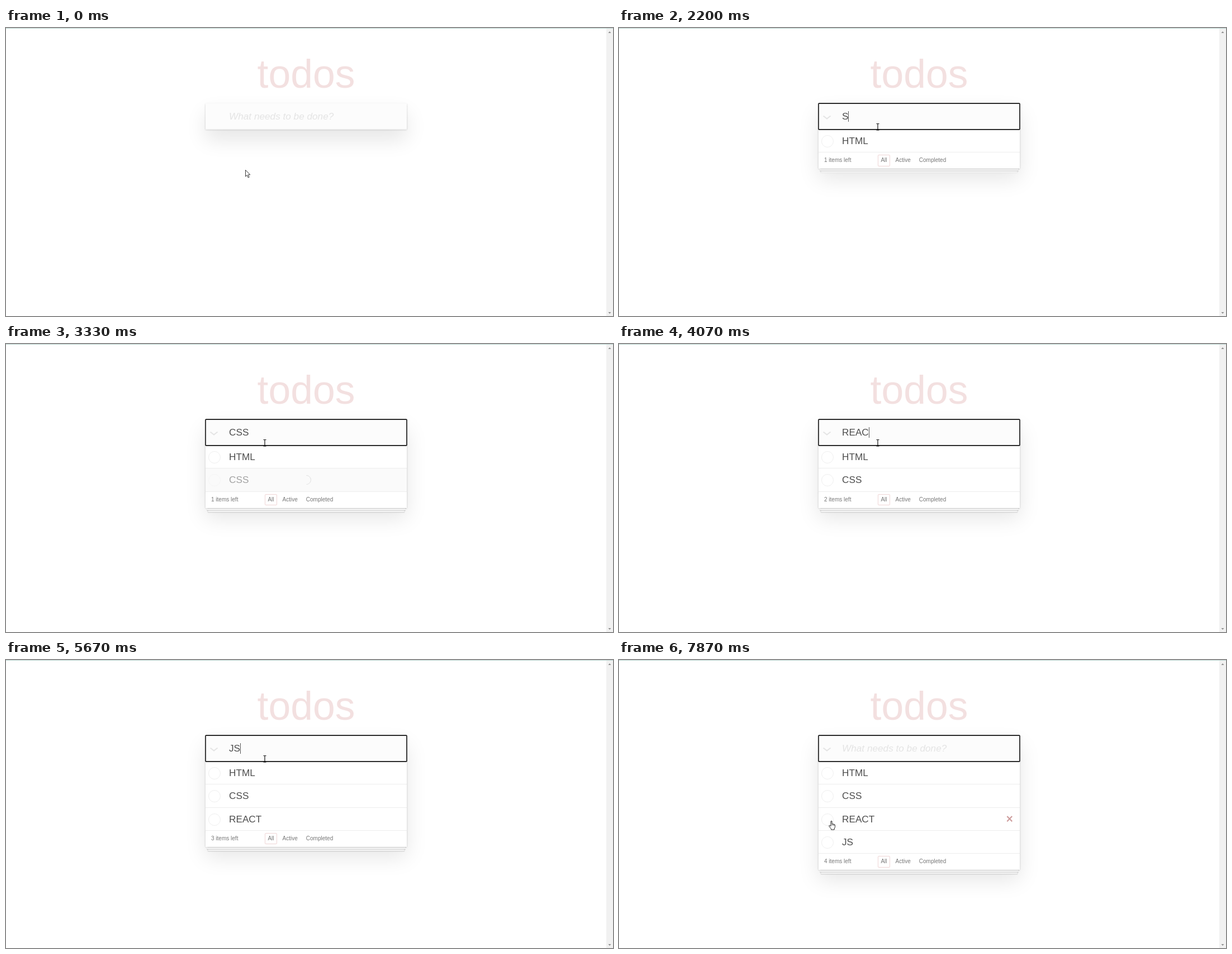
An HTML page that plays this animation: 1086x516 px, repeating every 8000 ms.

```html
<!DOCTYPE html>
<html lang="en">
<head>
<meta charset="utf-8">
<title>todos</title>
<style>
  html, body { margin: 0; width: 100%; height: 100%; overflow: hidden; background: #fff; }
  body { position: relative; font-family: "Liberation Sans", Arial, sans-serif; color: #4d4d4d; }
  div, span, svg { box-sizing: border-box; white-space: nowrap; }
  #edge { position: absolute; left: 0; top: 0; width: 100%; height: 1px; background: #b9d4cf; }
  #title { position: absolute; left: 357px; top: 41px; width: 360px; line-height: 82px;
    font-size: 71.5px; text-align: center; color: rgba(175, 47, 47, .15); }
  #card { position: absolute; left: 357px; top: 135px; width: 360px; background: #fff; font-size: 17.2px;
    box-shadow: 0 1.4px 2.9px rgba(0, 0, 0, .2), 0 17.9px 35.8px rgba(0, 0, 0, .1); }
  #field { position: relative; height: 47px; line-height: 47px; padding-left: 42px; display: flex;
    align-items: center; background: #fcfcfc; box-shadow: inset 0 -1.4px 1px rgba(0, 0, 0, .03); }
  #hint { position: absolute; left: 42px; top: 0; font-style: italic; color: #e4e4e4; }
  #caret { width: 1px; height: 19px; background: #555; }
  #ring { position: absolute; left: -1px; top: -1px; z-index: 2; }
  #chevron { position: absolute; left: 7px; top: 20px; }
  .row { position: relative; overflow: hidden; background: #fff; }
  .row .body { height: 41.33px; line-height: 41.33px; padding-left: 42px; border-bottom: 1px solid #ededed; }
  .row .dot { position: absolute; left: 5px; top: 10px; width: 22px; height: 22px;
    border: 1px solid #efefef; border-radius: 50%; }
  .row .cross { position: absolute; left: 335.5px; top: 0; line-height: 40px; font-size: 21.5px;
    color: #cc9a9a; -webkit-text-stroke: .5px #cc9a9a; }
  .pending { background: #fafafa; }
  .pending span { opacity: .5; }
  .spinner { position: absolute; left: 172px; top: 50%; width: 17px; height: 17px; margin-top: -8.5px;
    border: 1.4px solid #dbdbdb; border-right-color: transparent; border-top-color: transparent;
    border-radius: 50%; opacity: .8; }
  #footer { position: relative; height: 29px; line-height: 28px; font-size: 10.03px; color: #777; background: #fff;
    box-shadow: 0 .7px .7px rgba(0, 0, 0, .2), 0 5.7px 0 -2.1px #f6f6f6, 0 6.5px .7px -2.1px rgba(0, 0, 0, .2),
      0 11.5px 0 -4.3px #f6f6f6, 0 12.2px 1.4px -4.3px rgba(0, 0, 0, .2); }
  #footer span { position: absolute; top: 0; }
  #footer .chosen { left: 106px; top: 4px; width: 22px; height: 20.5px;
    border: 1px solid rgba(175, 47, 47, .2); border-radius: 2px; }
  #bar { position: absolute; right: 0; top: 1px; width: 12px; height: 515px; background: #f1f1f1; }
  #pointer { position: absolute; left: 0; top: 0; z-index: 3; }
</style>
</head>
<body>
<div id="title">todos</div>
<div id="card">
  <div id="field">
    <svg id="chevron" width="16" height="12" fill="none" stroke="#e4e4e4" stroke-width="2"><path d="M1.5 2.5L8 7.5 14.5 2.5"/></svg>
    <span id="hint">What needs to be done?</span>
    <span id="typed"></span>
    <span id="caret"></span>
    <svg id="ring" width="362" height="49" fill="none" stroke="#111" stroke-width="1.6"><rect x="1" y="1.1" width="360" height="46.8" rx="1"/></svg>
  </div>
  <div id="list"></div>
  <div id="footer">
    <span id="count" style="left:10px"></span>
    <span class="chosen"></span>
    <span style="left:111.4px">All</span>
    <span style="left:137.6px">Active</span>
    <span style="left:179.8px">Completed</span>
  </div>
</div>
<svg id="bar" viewBox="0 0 12 515" fill="#8f8f8f"><path d="M3.5 8L6 5 8.5 8zM3.5 508L6 511 8.5 508z"/></svg>
<div id="edge"></div>
<svg id="pointer" width="1086" height="516">
  <g id="arrow"><path d="M.5 .5V12l2.7-2.4 2 4.4 1.9-.8-2-4.3h3.7z" fill="#fff" stroke="#222" stroke-width=".9"/></g>
  <g id="beam"><path d="M-2.5-5.5h1.700l.8.6.8-.6h1.700M0-5V5M-2.5 5.8h1.700l.8-.6.8.6h1.700" fill="none" stroke="#111" stroke-width="1.2"/></g>
  <g id="hand"><path d="M-1 1q1-1.3 2 0V5.5l4 .9q1.5.5 1.5 2V10.5q0 2-1.3 3.5V16H-.5V14.5L-4 10q-.7-1.2.4-1.7.9-.2 2.6 1.5z" fill="#fff" stroke="#222"/><path d="M1.2 6V8.5M3.2 6.5V8.7M5 7V9" stroke="#222" stroke-width=".7"/></g>
</svg>
<script>
const LOOP = 8000, TICK = 200 / 3, ROW = 41.33, LIST_TOP = 182;
const $ = id => document.getElementById(id);
const show = (el, on) => { el.style.display = on ? '' : 'none'; };
const smooth = p => { p = Math.min(1, Math.max(0, p)); return p * p * (3 - 2 * p); };

// All times below are counted in ticks.
const items = [
  { name: 'HTML', sent: 22, saved: 28 },
  { name: 'CSS', sent: 46, saved: 52 },
  { name: 'REACT', sent: 69, saved: 77 },
  { name: 'JS', sent: 88, saved: 94 }
];
const FOCUS = 12, BLINK = 7.8;
const type = (word, ...ticks) => ticks.map((tick, i) => [tick, word.slice(0, i + 1)]);
const edits = [
  [0, ''], [FOCUS, ''], ...type('HTML', 16, 17, 18, 19),
  [28, ''], [33, 'S'], [37, ''], ...type('CSS', 40, 41, 43),
  [52, ''], ...type('REACT', 58, 59, 60, 61, 62),
  [77, ''], ...type('JS', 84, 85), [94, '']
];
const moves = [
  { from: 0, to: 4, x: 463, y: 177 },
  { from: 98, to: 104, x: 432, y: 341 },
  { from: 109, to: 118, x: 380, y: 288 }
];

function makeRow(name, pending) {
  const el = document.createElement('div');
  el.className = pending ? 'row pending' : 'row';
  el.innerHTML = `<div class="body"><span class="label">${name}</span></div><span class="dot"></span>` +
    (pending ? '<div class="spinner"></div>' : '<div class="cross">×</div>');
  $('list').append(el);
  return el;
}
const rows = items.map(item => makeRow(item.name));
const draft = makeRow('', true);

const slide = ticks => smooth((ticks * TICK + 23) / 300);

function setHeight(el, height) {
  show(el, height > 0);
  el.style.height = height + 'px';
}

function pointerAt(tick) {
  let x = 428, y = 254;
  for (const m of moves) {
    const p = smooth((tick - m.from) / (m.to - m.from));
    x += (m.x - x) * p;
    y += (m.y - y) * p;
  }
  return { x, y };
}

function drawField(tick) {
  const [since, text] = edits.filter(e => e[0] <= tick).pop();
  const busy = items.some(i => tick >= i.sent && tick < i.saved);
  const lit = Math.floor((tick - since) / BLINK) % 2 === 0;
  $('typed').textContent = text;
  show($('hint'), !text);
  show($('caret'), tick >= FOCUS && !busy && lit);
  show($('ring'), tick >= FOCUS);
}

function drawList(tick, hovered) {
  items.forEach((item, i) => {
    setHeight(rows[i], tick < item.saved ? 0 : ROW * slide(tick - item.saved));
    show(rows[i].querySelector('.cross'), i === hovered);
  });
  // A saved draft closes while its finished row opens above it.
  const latest = items.filter(i => tick >= i.sent).pop();
  let height = 0;
  if (latest) {
    const open = slide(tick - latest.sent), shut = slide(tick - latest.saved);
    height = tick < latest.saved ? ROW * open : shut < 1 ? ROW * (1 - shut) + .6 : 0;
    draft.querySelector('.label').textContent = latest.name;
    const turn = (Math.min(tick - latest.sent, 4) * TICK + 23) / 500 * 360 + 15;
    draft.querySelector('.spinner').style.transform = `rotate(${turn}deg)`;
  }
  setHeight(draft, height);
  const saved = items.filter(i => tick >= i.saved).length;
  show($('footer'), saved);
  show($('chevron'), saved);
  $('count').textContent = saved + ' items left';
}

function drawPointer(x, y, hovered) {
  const kind = y < LIST_TOP ? 'beam' : hovered >= 0 && x < 386 ? 'hand' : 'arrow';
  for (const id of ['arrow', 'beam', 'hand']) show($(id), id === kind);
  $(kind).setAttribute('transform', `translate(${x} ${y})`);
}

function draw(ms) {
  const tick = Math.floor((ms % LOOP + 5) / TICK) % 120;
  const { x, y } = pointerAt(tick);
  const hovered = tick < items[3].saved ? -1 : Math.floor((y - LIST_TOP) / ROW);
  drawField(tick);
  drawList(tick, hovered);
  drawPointer(x, y, hovered);
}

let start;
function loop(now) {
  start ??= now;
  draw(now - start);
  requestAnimationFrame(loop);
}
draw(0);
requestAnimationFrame(loop);
</script>
</body>
</html>
```
